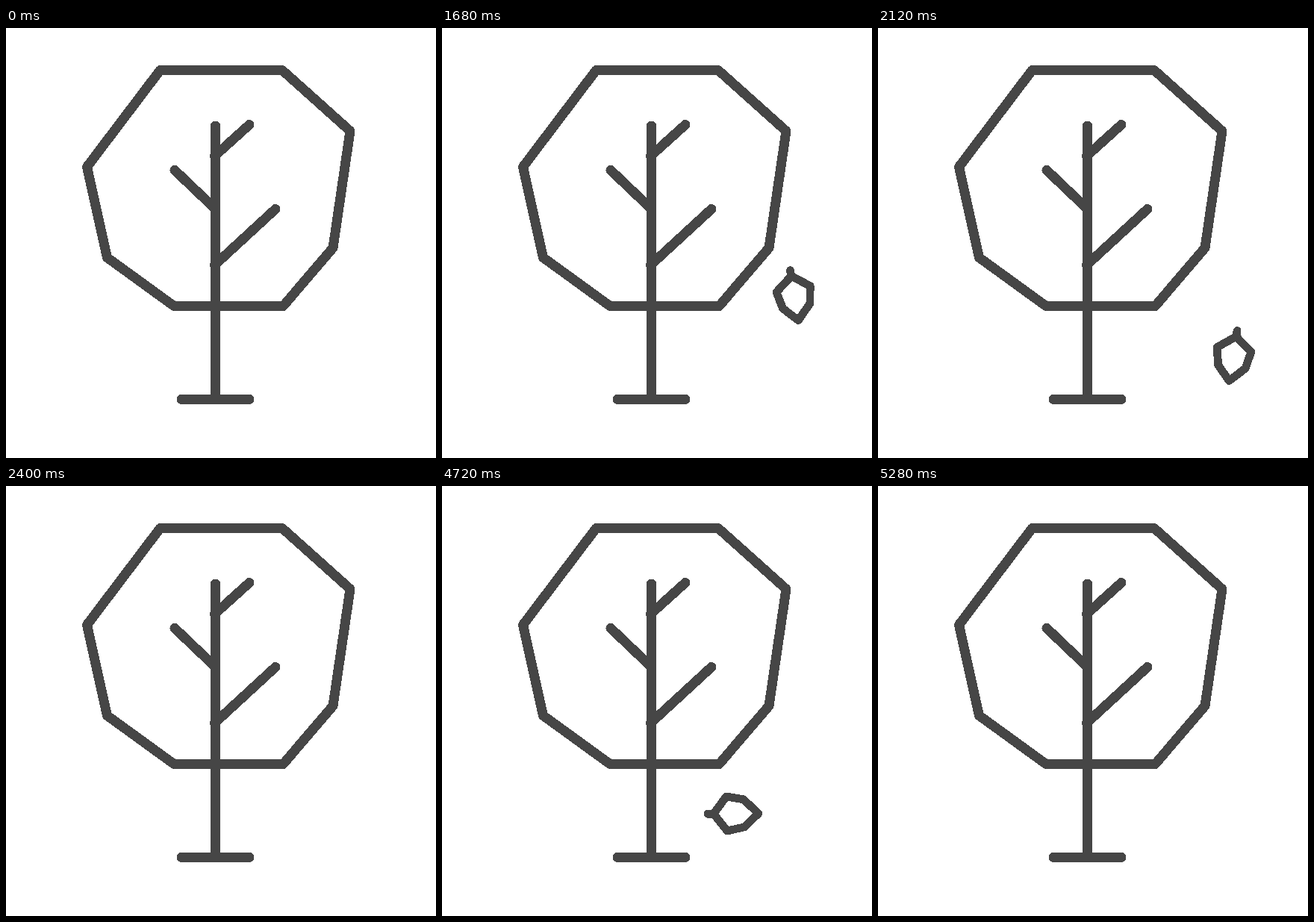
An HTML page that plays this animation: 576 px wide and 576 px high, repeating every 6880 ms.

```html
<!DOCTYPE html>
<html lang="en">
<head>
<meta charset="utf-8">
<title>Tree with falling leaves</title>
<style>
  html, body { margin: 0; width: 100%; height: 100%; overflow: hidden; background: #fff; }
  svg { display: block; width: 100vw; height: 100vh; }
  path { fill: none; stroke: #464646; stroke-linecap: round; stroke-linejoin: round; shape-rendering: crispEdges; }
  .tree path { stroke-width: 13; }
  .tree .crown { fill: #fff; }
  .leaf { stroke-width: 10.8; visibility: hidden; }
</style>
</head>
<body>
<svg viewBox="0 0 576 576">
  <path class="leaf" d="M-38 0H-30L-13 -23L10 -19L30 0L11 18L-12 23L-30 0"/>
  <path class="leaf" d="M-38 0H-30L-13 -23L10 -19L30 0L11 18L-12 23L-30 0"/>
  <g class="tree">
    <path class="crown" d="M206.5 56.5H370L461 138L438 294.5L371 372.8H225.5L135.5 307.5L108.5 186Z"/>
    <path d="M280.5 131V497.3M235 497.3H326"/>
    <path d="M279.5 171.5L326 129.5M226 190.5L280 242M279.5 317.5L361 242.5"/>
  </g>
</svg>
<script>
const LOOP = 6880, STEP = 40, FADE = 240;

// Each leaf drifts along one cubic curve while turning steadily
const falls = [
  { from: 1400, life: 1000, x: [420, 527, 446.5, 488], y: [280, 391.7, 453.2, 464], turn: [69, 111] },
  { from: 4320, life: 960, x: [347, 347, 474, 462], y: [354, 510.5, 386.7, 470], turn: [12, -18] }
];
const leaves = document.querySelectorAll('.leaf');

const mix = (a, b, u) => a + (b - a) * u;

// Point on a curve of any degree
function curve(p, u) {
  while (p.length > 1) p = p.slice(1).map((b, i) => mix(p[i], b, u));
  return p[0];
}

function draw(t) {
  falls.forEach(({ from, life, x, y, turn }, n) => {
    const { style } = leaves[n], u = (t - from) / life;
    style.visibility = u >= 0 && u < 1 ? 'visible' : 'hidden';
    style.opacity = Math.min(1, (1 - u) * life / FADE);
    leaves[n].setAttribute('transform',
      `translate(${curve(x, u)} ${curve(y, u)}) rotate(${curve(turn, u)})`);
  });
}

const start = performance.now();
function tick() {
  const t = (performance.now() - start) % LOOP;
  draw(Math.floor(t / STEP) * STEP);
  requestAnimationFrame(tick);
}
tick();
</script>
</body>
</html>
```
